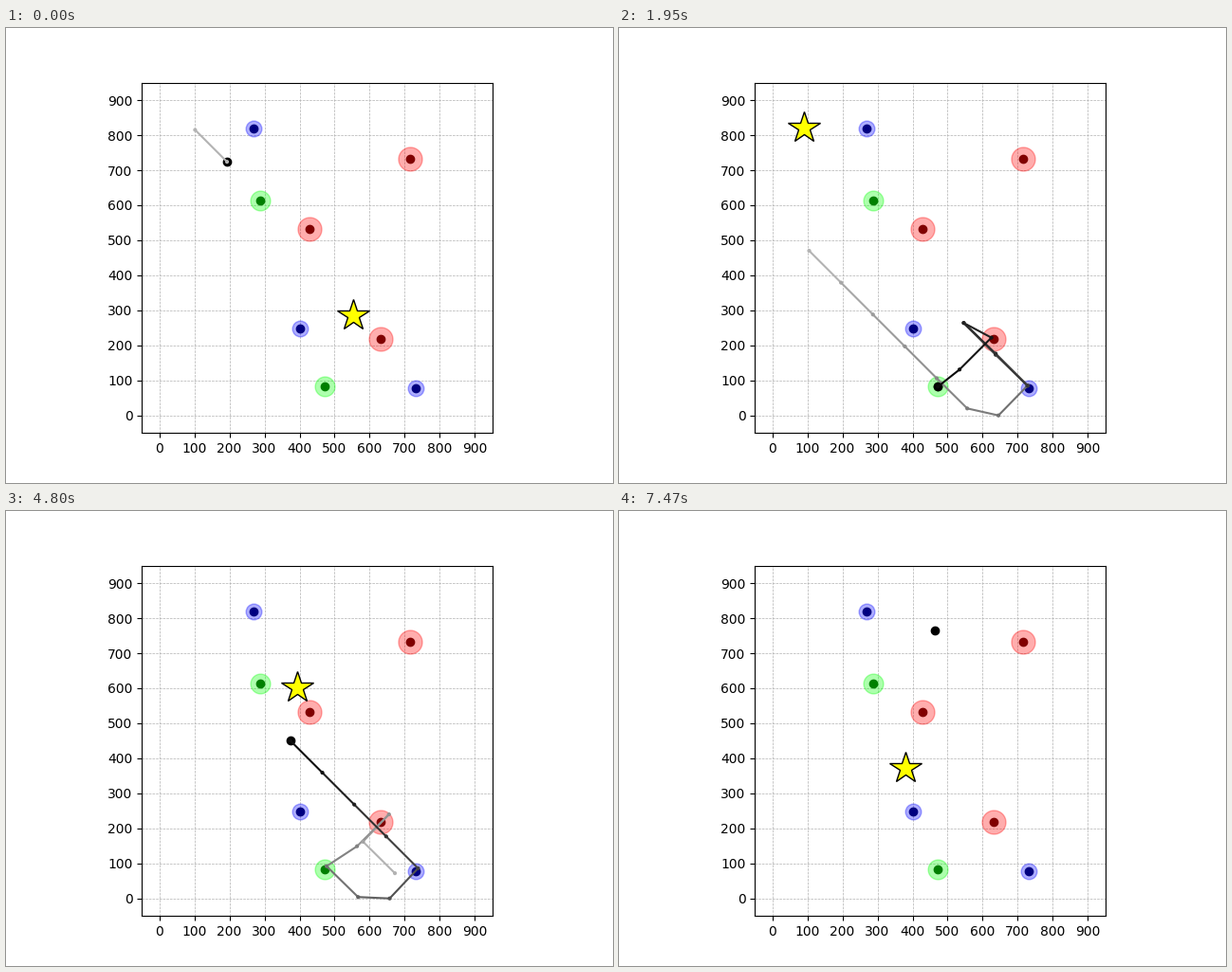
Animation, 640 px wide and 480 px high, one loop 7500 ms. Source, as a matplotlib script:

```python
import matplotlib.pyplot as plt
import numpy as np
from matplotlib.animation import FuncAnimation
from matplotlib.collections import LineCollection

EPISODE = 50   # positions per episode
STEP = 91      # largest move per axis

# fill colour, dot colour, halo size, centres
ZONES = [
    ("red", "maroon", 18, [(715, 733), (428, 532), (632, 219)]),
    ("lime", "green", 15, [(287, 613), (471, 83)]),
    ("blue", "navy", 12, [(268, 818), (400, 247), (731, 77)]),
]
STARS = [(554, 285), (90, 822), (93, 778), (394, 602), (530, 380), (381, 372)]


def circuit(x, y, end):
    """From the green zone along the floor to the blue zone."""
    return [(x, y), (x + 90, max(y - 88, 0)), (x + 180, 0), (end, 86)]


ROUTES = [
    [(102, 815), (548, 362)] + [(546, 285), (623, 225)] * 3
    + circuit(482, 65, 747) + [(574, 262), (545, 303)],

    [(105, 470), (556, 20), (645, 0)] + [(728, 85), (546, 264)] * 2
    + [(625, 222)] + circuit(472, 82, 728) + [(95, 713), (105, 822)],

    [(413, 765), (592, 585), (603, 495), (556, 405), (601, 314), (585, 225),
     (635, 218)] + circuit(478, 85, 730) + [(97, 713), (115, 790), (101, 786)],

    [(672, 72), (581, 162), (655, 240)] + circuit(477, 92, 738)
    + [(286, 540), (365, 612), (390, 625)],

    [(430, 480)] + ([(632, 222)] + circuit(474, 84, 733)) * 2 + [(532, 366)],

    [(464, 766)],
]


def walk(points, rng):
    """Head for each waypoint with clipped steps, then hover at the last."""
    pos = np.array(points[0], float)
    path = [pos]
    for target in points[1:]:
        while np.any(pos != target):
            pos = pos + np.clip(np.array(target) - pos, -STEP, STEP)
            path.append(pos)
    while len(path) < EPISODE:
        path.append(pos + rng.uniform(-4, 4, 2))
    return np.array(path[:EPISODE])


rng = np.random.default_rng(4)
paths = [walk(route, rng) for route in ROUTES]

fig, ax = plt.subplots(figsize=(6.4, 4.8), dpi=100)
ax.set_aspect("equal")
limits, ticks = (-50, 950), range(0, 901, 100)
ax.set(xlim=limits, ylim=limits, xticks=ticks, yticks=ticks)
ax.grid(linestyle="--", linewidth=0.5)

for fill, dot, size, centres in ZONES:
    xs, ys = zip(*centres)
    ax.plot(xs, ys, "o", color=fill, ms=size, alpha=0.32)
    ax.plot(xs, ys, "o", color=dot)

head, = ax.plot([], [], "o", color="black")
star, = ax.plot([], [], "*", color="yellow", mec="black", ms=25)
trail = LineCollection([], capstyle="projecting", zorder=2.3)
ax.add_collection(trail, autolim=False)
joints = ax.scatter([], [], s=9, edgecolors="none", zorder=2.3)


def update(frame):
    episode, step = divmod(frame + 1, EPISODE)
    path = paths[episode][:step + 1]
    x, y = STARS[episode]
    star.set_data([x], [y])
    head.set_data(path[-1:].T)

    # the trail runs from light grey to black
    shades = [str(0.7 * (1 - i / step)) for i in range(step)]
    trail.set_segments(list(np.stack([path[:-1], path[1:]], axis=1)))
    trail.set_color(shades)
    joints.set_offsets(path if step else np.empty((0, 2)))
    joints.set_facecolor(shades + shades[-1:])
    return head, star, trail, joints


anim = FuncAnimation(fig, update, frames=5 * EPISODE, interval=30, repeat=True)
plt.show()
```
